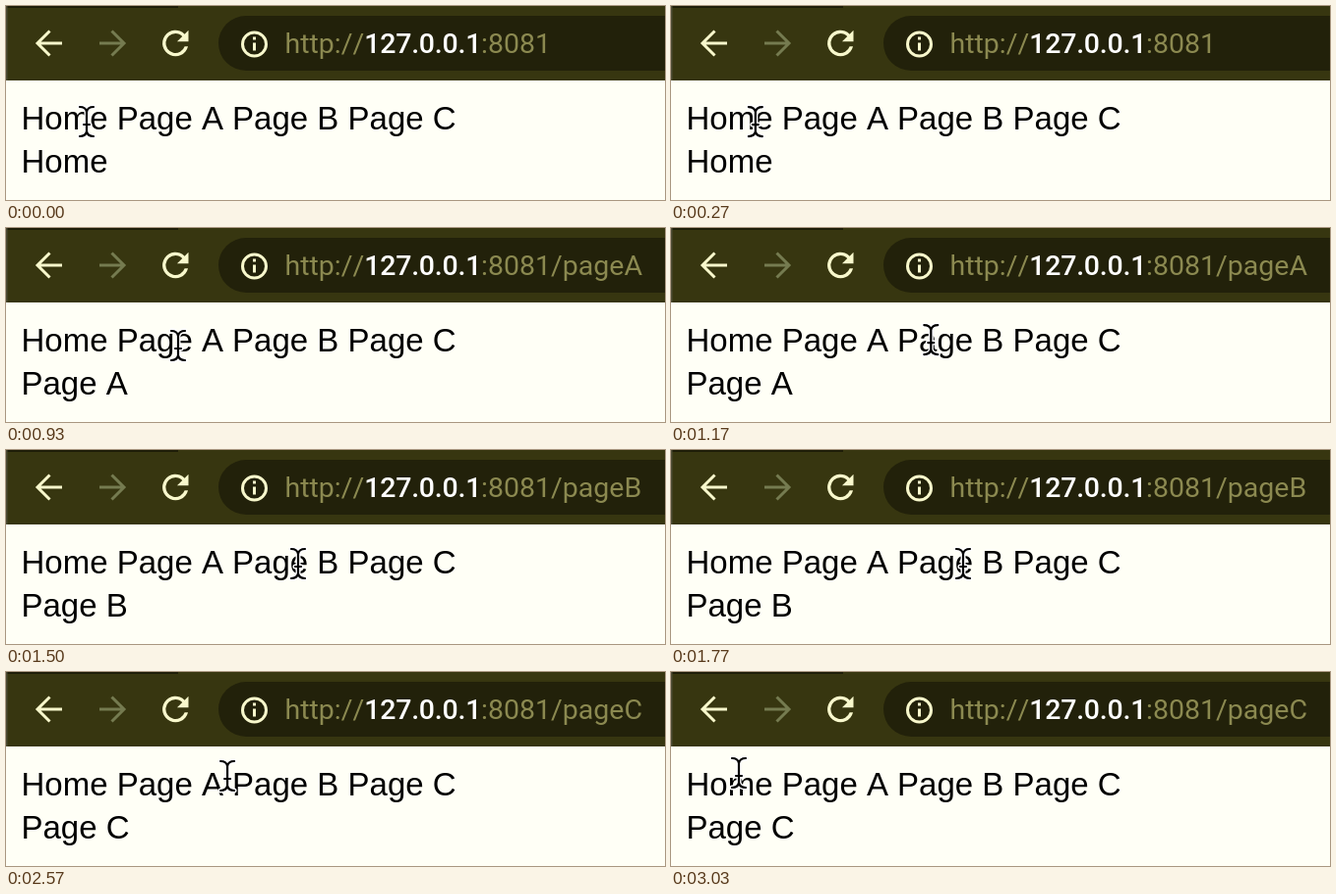
These frames come from a looping animation (670x198 px, 3060 ms). An HTML page:

```html
<!DOCTYPE html>
<html lang="en">
<head>
<meta charset="utf-8">
<title>Page routing</title>
<style>
html, body { margin: 0; width: 100%; height: 100%; overflow: hidden; background: #fffff6; }
svg { display: block; }
.page { font: 33px "Liberation Sans", Arial, sans-serif; font-kerning: none; fill: #000; }
.url { font: 28.5px Roboto, Inter, sans-serif; font-kerning: none; fill: #8b8950; }
.host { font-weight: 500; letter-spacing: -.25px; fill: #fff; }
.icon { fill: none; stroke: #f8f8cc; stroke-width: 3; }
</style>
</head>
<body>
<svg width="670" height="198" viewBox="0 0 670 198">
  <defs>
    <path id="beam" d="M-7-15Q-1-15 0-10Q1-15 7-15M0-10V10M-7 15Q-1 15 0 10Q1 15 7 15M-3 3H3"/>
  </defs>
  <rect width="670" height="76" fill="#373610"/>
  <rect width="175" height="2" fill="#1e1d08"/>
  <rect width="1.5" height="76" fill="#4c4b34"/>
  <rect x="216" y="10" width="520" height="56" rx="28" fill="#22210a"/>

  <g class="icon">
    <path d="M57 38H33M44.5 25.5L32 38l12.5 12.5"/>
    <path d="M95 38h24M107.5 25.5L120 38l-12.5 12.5" stroke="#757b50"/>
    <circle cx="252.5" cy="39" r="12"/>
    <path d="M252.5 37.5v8M252.5 31.5v3"/>
  </g>
  <path transform="translate(152.5 18.2) scale(1.65)" fill="#f8f8cc"
    d="M17.65 6.35A8 8 0 1 0 19.73 14h-2.08A6 6 0 1 1 12 6c1.66 0 3.14.69 4.22 1.78L13 11h7V4z"/>

  <text class="url" x="283.5" y="48">http://<tspan class="host">127.0.0.1</tspan>:8081<tspan id="path"></tspan></text>

  <g class="page">
    <text x="15.5" y="126">Home Page A Page B Page C</text>
    <text id="view" x="15.5" y="170"></text>
  </g>

  <g id="cursor" fill="none" stroke-linecap="round">
    <use href="#beam" stroke="#fff" stroke-width="5"/>
    <use href="#beam" stroke="#000" stroke-width="2.2"/>
  </g>
</svg>
<script>
const LOOP = 3060, STEP = 100 / 3;
const $ = id => document.getElementById(id);

// Pointer stops: time, x, y
const stops = [
  [0, 82, 118], [220, 82, 118], [600, 175, 120], [920, 175, 120],
  [1180, 265, 114], [1340, 297, 116], [1820, 297, 116], [2170, 373, 113],
  [2340, 373, 113], [2570, 225, 106], [2980, 69, 103], [LOOP, 69, 103]
];
// Clicks: time, page letter
const clicks = [[0, ""], [800, "A"], [1450, "B"], [2300, "C"]];

function pointer(t) {
  const i = stops.findIndex(s => s[0] > t);
  const [t0, x0, y0] = stops[i - 1], [t1, x1, y1] = stops[i];
  const u = (t - t0) / (t1 - t0), e = u * u * (3 - 2 * u);
  return [x0 + (x1 - x0) * e, y0 + (y1 - y0) * e];
}

function draw(now) {
  const t = Math.floor(now % LOOP / STEP) * STEP;
  const page = clicks.filter(c => c[0] <= t).pop()[1];
  $("path").textContent = page && "/page" + page;
  $("view").textContent = page ? "Page " + page : "Home";
  $("cursor").setAttribute("transform", `translate(${pointer(t)})`);
}

const start = performance.now();
function tick() {
  draw(performance.now() - start);
  requestAnimationFrame(tick);
}
tick();
</script>
</body>
</html>
```
